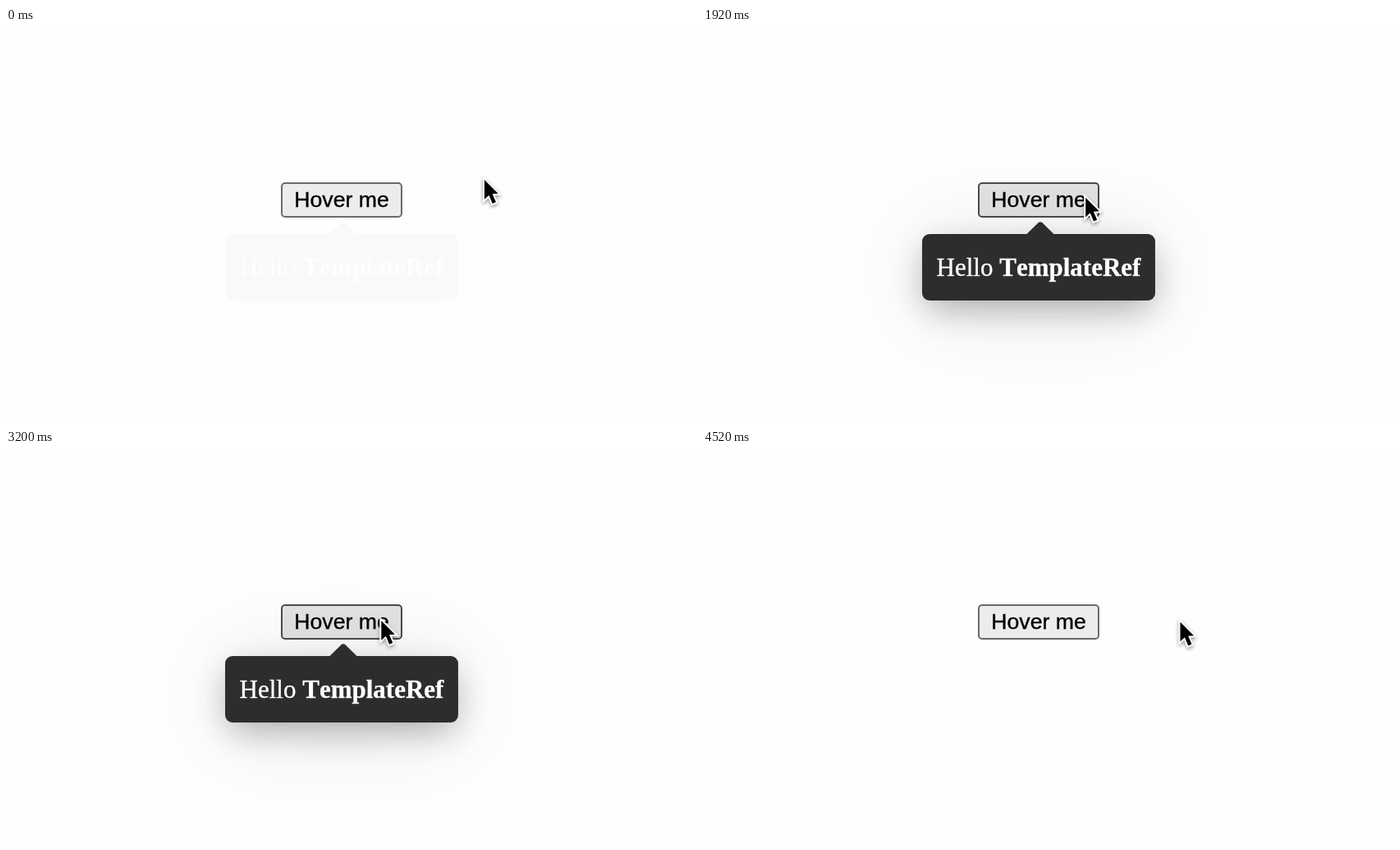
Animation of 842 by 480 pixels, one loop 5.02 s. Source, as an HTML page with a canvas:

```html
<!DOCTYPE html>
<html lang="en">
<head>
<meta charset="utf-8">
<title>Tooltip on hover</title>
<style>
  html, body { margin: 0; width: 100%; height: 100%; overflow: hidden; background: #fefefe; }
  canvas { display: block; }
</style>
</head>
<body>
<canvas id="stage" width="842" height="480"></canvas>
<script>
const W = 842, H = 480, LOOP = 5020, STEP = 20;
const FADE_IN = 200, FADE_OUT = 250, FAINT = 0.018;
const button = { x: 335, y: 188, w: 148, h: 43 };
const box = { x: 267, y: 251, w: 284, h: 81 };
const middle = box.x + box.w / 2;
const edge = button.x + button.w;
const ctx = document.getElementById('stage').getContext('2d');

// The pointer rushes in and settles, and leaves in a smooth swing.
// Each easing comes with its inverse, which tells when it crosses the edge.
const settle = { at: s => 1 - (1 - s) ** 4, inverse: f => 1 - (1 - f) ** 0.25 };
const swing = {
  at: s => s < 0.5 ? 4 * s ** 3 : 1 - 4 * (1 - s) ** 3,
  inverse: f => f < 0.5 ? Math.cbrt(f / 4) : 1 - Math.cbrt((1 - f) / 4)
};

const move = (start, end, from, to, easing) => {
  const f = (edge - from.x) / (to.x - from.x);
  const cross = start + (end - start) * easing.inverse(f);
  return { start, end, from, to, easing, cross, enters: to.x < edge };
};

const point = (x, y) => ({ x, y });
const rest = point(583, 185), left = point(444, 210.5), away = point(563, 190);
const inside = point(457, 208), last = point(581.5, 209.5);
const moves = [
  move(557, 1030, rest, left, settle),
  move(1740, 2240, left, away, swing),
  move(2862, 3300, away, inside, settle),
  move(4000, 4520, inside, last, swing)
];

const clamp = v => Math.min(1, Math.max(0, v));
const mix = (a, b, f) => a + (b - a) * f;
const bezier = (a, b, s) => 3 * a * s * (1 - s) ** 2 + 3 * b * s * s * (1 - s) + s ** 3;

// The CSS "ease" curve
function ease(p) {
  let lo = 0, hi = 1;
  for (let i = 0; i < 20; i++) {
    const mid = (lo + hi) / 2;
    if (bezier(0.25, 0.25, mid) < p) lo = mid; else hi = mid;
  }
  return bezier(0.1, 1, lo);
}

function pointerAt(t) {
  const m = moves.findLast(m => m.start <= t) || moves[0];
  const f = m.easing.at(clamp((t - m.start) / (m.end - m.start)));
  return point(mix(m.from.x, m.to.x, f), mix(m.from.y, m.to.y, f));
}

function opacityAt(t) {
  if (t < moves[0].start) return FAINT;
  const m = moves.findLast(m => m.cross <= t);
  if (!m) return 0;
  const p = ease(clamp((t - m.cross) / (m.enters ? FADE_IN : FADE_OUT)));
  return m.enters ? p : 1 - p;
}

// A hairline in the same colour gives the text its smoothed weight
function label(c, text, x, y, font, color) {
  c.font = font;
  c.fillStyle = c.strokeStyle = color;
  c.lineWidth = 0.35;
  c.fillText(text, x, y);
  c.strokeText(text, x, y);
}

function boxPath(c, { x, y, w, h }, r, grow = 0, shift = 0) {
  c.beginPath();
  c.roundRect(x - grow + shift, y - grow, w + 2 * grow, h + 2 * grow, r);
}

// The shape is drawn off stage so that only its shadow lands on it
function boxShadow(c, dy, blur, spread, alpha) {
  c.save();
  c.shadowColor = `rgba(0,0,0,${alpha})`;
  c.shadowBlur = blur;
  c.shadowOffsetX = 2000;
  c.shadowOffsetY = dy;
  boxPath(c, box, 8, spread, -2000);
  c.fill();
  c.restore();
}

function makeTooltip() {
  const layer = document.createElement('canvas');
  layer.width = W;
  layer.height = H;
  const c = layer.getContext('2d');
  boxShadow(c, 8, 122, 0, 0.11);
  boxShadow(c, 14, 44, -4, 0.3);
  c.fillStyle = '#2d2d2d';
  boxPath(c, box, 9);
  c.fill();
  c.fill(new Path2D('M394 251.5L408.5 237.3Q411 235 413.5 237.3L428 251.5Z'));

  const plain = '31px "Liberation Serif", "Times New Roman", serif', bold = 'bold ' + plain;
  const width = (font, text) => (c.font = font, c.measureText(text).width);
  c.fontKerning = 'none';
  const lead = width(plain, 'Hello ');
  const x = middle - (lead + width(bold, 'TemplateRef')) / 2;
  label(c, 'Hello', x, 302, plain, '#fff');
  label(c, 'TemplateRef', x + lead, 302, bold, '#fff');
  return layer;
}

function drawButton(hover) {
  boxPath(ctx, button, 4, -1);
  ctx.fillStyle = hover ? '#e3e3e3' : '#ececec';
  ctx.fill();
  ctx.lineWidth = 2;
  ctx.strokeStyle = hover ? '#4b4b4b' : '#6a6a6a';
  ctx.stroke();
  ctx.textAlign = 'center';
  label(ctx, 'Hover me', middle, 218, '26.67px "Liberation Sans", Arial, sans-serif', '#000');
}

const arrow = new Path2D('M0 0V23.8L5.5 18.7L9.8 28.9L14 27.1L9.7 17.1L16.7 16.7Z');

function drawPointer({ x, y }) {
  ctx.save();
  ctx.translate(x, y);
  ctx.save();
  ctx.shadowColor = 'rgba(0,0,0,0.4)';
  ctx.shadowBlur = 4;
  ctx.shadowOffsetY = 2;
  ctx.lineWidth = 4;
  ctx.strokeStyle = '#fff';
  ctx.stroke(arrow);
  ctx.restore();
  ctx.fillStyle = '#000';
  ctx.fill(arrow);
  ctx.restore();
}

const tooltip = makeTooltip();

function draw(t) {
  const pointer = pointerAt(t);
  ctx.fillStyle = '#fefefe';
  ctx.fillRect(0, 0, W, H);
  drawButton(pointer.x <= edge);
  ctx.globalAlpha = opacityAt(t);
  ctx.drawImage(tooltip, 0, 0);
  ctx.globalAlpha = 1;
  drawPointer(pointer);
}

const begin = performance.now();

function tick() {
  const t = (performance.now() - begin) % LOOP;
  draw(Math.floor(t / STEP) * STEP);
  requestAnimationFrame(tick);
}

tick();
</script>
</body>
</html>
```
